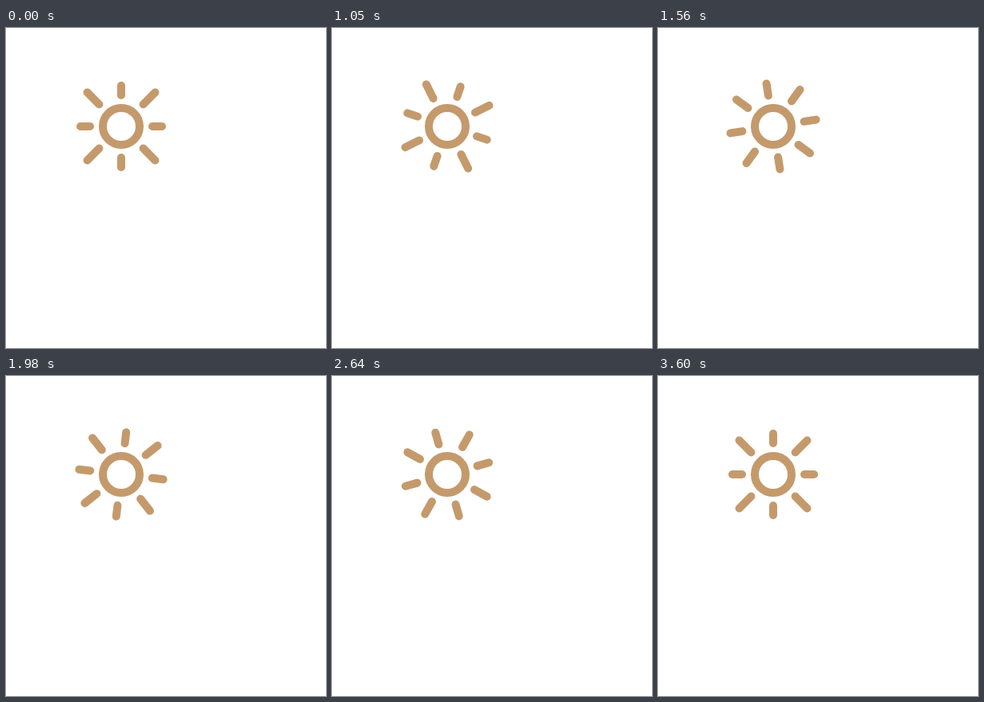
Animation, 400 px wide and 400 px high, one loop 4130 ms. Source, as an HTML page with a canvas:

```html
<!DOCTYPE html>
<html lang="en">
<head>
<meta charset="utf-8">
<title>Turning sun</title>
<style>
  html, body { margin: 0; width: 100%; height: 100%; overflow: hidden; background: #fff; }
  canvas { display: block; }
</style>
</head>
<body>
<canvas id="stage" width="400" height="400"></canvas>
<script>
const ctx = document.getElementById('stage').getContext('2d');

const LOOP = 4130, STEP = 30;
const TURN_TIME = 3600, PULSE_TIME = 600;
const CENTER = { x: 144, y: 123 };
const RING = 23, RAY_START = 39, RAY_SHORT = 51, RAY_LONG = 60;

const ease = p => p * p * (3 - 2 * p);
const mix = (a, b, p) => a + (b - a) * p;

// Rises from 0 to 1 and falls back, easing at both ends.
function pulse(time) {
  const phase = (time / PULSE_TIME) % 2;
  return ease(phase < 1 ? phase : 2 - phase);
}

function drawRay(angle, end) {
  const dx = Math.sin(angle), dy = -Math.cos(angle);
  ctx.beginPath();
  ctx.moveTo(dx * RAY_START, dy * RAY_START);
  ctx.lineTo(dx * end, dy * end);
  ctx.stroke();
}

function draw(time) {
  const turn = ease(time / TURN_TIME) * Math.PI / 2;
  const growth = pulse(time);

  ctx.setTransform(1, 0, 0, 1, 0, 0);
  ctx.fillStyle = '#fff';
  ctx.fillRect(0, 0, 400, 400);
  ctx.translate(CENTER.x, CENTER.y);
  ctx.strokeStyle = '#c49a6c';
  ctx.lineWidth = 10;
  ctx.lineCap = 'round';

  ctx.beginPath();
  ctx.arc(0, 0, RING, 0, Math.PI * 2);
  ctx.stroke();

  // Neighbouring rays pulse in opposite directions.
  for (let i = 0; i < 8; i++) {
    const amount = i % 2 ? 1 - growth : growth;
    drawRay(turn + i * Math.PI / 4, mix(RAY_SHORT, RAY_LONG, amount));
  }
}

const start = performance.now();

function frame() {
  const elapsed = (performance.now() - start) % LOOP;
  draw(Math.min(Math.floor(elapsed / STEP) * STEP, TURN_TIME));
  requestAnimationFrame(frame);
}

frame();
</script>
</body>
</html>
```
